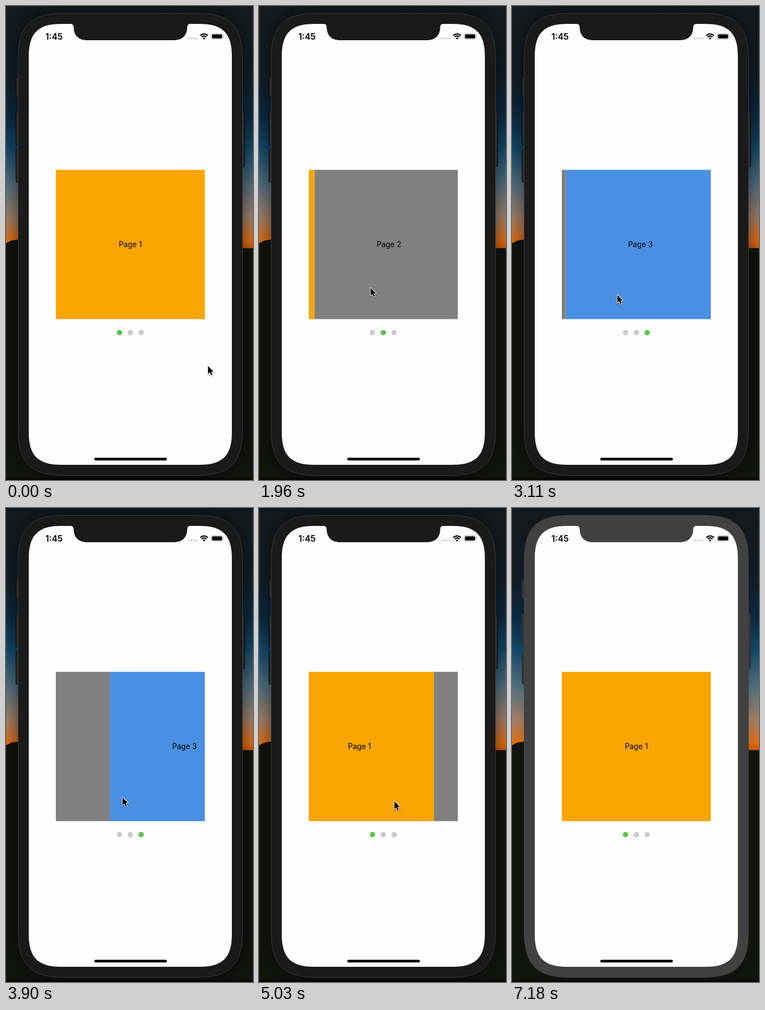
These frames come from a looping animation (456x873 px, 7.28 s). An HTML page:

```html
<!DOCTYPE html>
<html lang="en">
<head>
<meta charset="utf-8">
<title>Page view demo</title>
<style>
  html, body { margin: 0; width: 100%; height: 100%; overflow: hidden; background: #12140f; }
  svg { display: block; width: 100%; height: 100%; }
  text { font-family: Inter, "Open Sans", sans-serif; fill: #000; }
  .label { font-size: 14px; letter-spacing: -.08px; text-anchor: middle; }
  .clock { font-size: 15.8px; font-weight: 600; }
</style>
</head>
<body>
<svg viewBox="0 0 456 873">
  <defs>
    <linearGradient id="sky" gradientUnits="userSpaceOnUse" x1="0" y1="0" x2="0" y2="450">
      <stop offset="0" stop-color="#141a1d"/>
      <stop offset=".3" stop-color="#131e27"/>
      <stop offset=".46" stop-color="#0c2d47"/>
      <stop offset=".58" stop-color="#134b6c"/>
      <stop offset=".74" stop-color="#5b7584"/>
      <stop offset=".87" stop-color="#a98469"/>
      <stop offset=".96" stop-color="#e87316"/>
      <stop offset="1" stop-color="#d05804"/>
    </linearGradient>
    <filter id="blur" x="-30%" y="-20%" width="160%" height="140%"><feGaussianBlur stdDeviation="20"/></filter>
    <filter id="soft" x="-60%" y="-60%" width="220%" height="220%"><feGaussianBlur stdDeviation="1"/></filter>
    <clipPath id="pager"><rect x="92" y="301.650" width="275" height="275"/></clipPath>
    <path id="arrow" d="M0 0V14.400L3.300 11.400L5.600 16.800L7.900 15.800L5.600 10.500H10Z"/>
  </defs>

  <rect width="456" height="450" fill="url(#sky)"/>
  <path d="M0 437L10 432L24 430H60V446H456V873H0Z" fill="#131511"/>
  <rect y="869" width="456" height="4" fill="#0a0809"/>

  <path id="shadow" filter="url(#blur)"/>
  <g id="buttons">
    <rect x="18.5" y="132.5" width="8" height="34" rx="2"/>
    <rect x="18.5" y="195.5" width="8" height="60" rx="2"/>
    <rect x="18.5" y="264.5" width="8" height="60" rx="2"/>
    <rect x="432.5" y="195.5" width="8" height="100" rx="2"/>
  </g>
  <path id="body"/>
  <path id="screen" fill="#fefefe"/>
  <path id="notch" d="M118 32.5C123 33 125 35 125 40C125.5 54 134 63 150 63H309.5C325.5 63 334 54 334.5 40C334.5 35 336.5 33 341.5 32.5Z"/>

  <text class="clock" x="72.700" y="61.500">1:45</text>
  <g id="signal" fill="#cbcbcb"></g>
  <g fill="none" stroke="#000" stroke-width="2.200">
    <path d="M358.700 54.300Q365.700 48.300 372.700 54.300"/>
    <path d="M361.200 57.100Q365.700 53.300 370.200 57.100"/>
  </g>
  <path d="M363.200 59.200Q365.700 57.200 368.200 59.200L365.700 61.700Z"/>
  <rect x="378.700" y="50.700" width="21.800" height="10.600" rx="3" fill="none" stroke="#a5a5a5"/>
  <rect x="380.300" y="52.300" width="18.600" height="7.400" rx="1.600"/>
  <path d="M401.500 54.200Q403.300 56 401.500 57.800Z" fill="#a5a5a5"/>

  <g clip-path="url(#pager)"><g id="pages"></g></g>
  <g id="dots"></g>
  <rect x="163" y="832" width="134" height="5" rx="2.500"/>

  <g id="cursor">
    <use href="#arrow" y="1.500" stroke="#000" stroke-width="2" opacity=".35" filter="url(#soft)"/>
    <use href="#arrow" fill="#fff" stroke="#fff" stroke-width="2" stroke-linejoin="round"/>
    <use href="#arrow"/>
  </g>
</svg>
<script>
const LOOP = 7280, STEP = 88.2, SIZE = 275;
const BLUR_AT = 7180, CURSOR_OUT = 5390;
const $ = id => document.getElementById(id);

function add(parent, tag, attrs, text) {
  const el = document.createElementNS('http://www.w3.org/2000/svg', tag);
  set(el, attrs);
  if (text) el.textContent = text;
  parent.appendChild(el);
  return el;
}

function set(el, attrs) {
  for (const k in attrs) el.setAttribute(k, attrs[k]);
}

// Rectangle with continuous corners: e = corner extent, c = handle offset
function squircle(x, y, w, h, e, c) {
  const r = x + w, b = y + h;
  return `M${x} ${y + e}C${x} ${y + c} ${x + c} ${y} ${x + e} ${y}H${r - e}` +
    `C${r - c} ${y} ${r} ${y + c} ${r} ${y + e}V${b - e}` +
    `C${r} ${b - c} ${r - c} ${b} ${r - e} ${b}H${x + e}` +
    `C${x + c} ${b} ${x} ${b - c} ${x} ${b - e}Z`;
}

const shell = squircle(22.5, 13.5, 414, 851, 84, 23);
set($('shadow'), { d: shell });
set($('body'), { d: shell });
set($('screen'), { d: squircle(42, 33, 375, 812, 60, 17) });

for (let i = 0; i < 4; i++) add($('signal'), 'circle', { cx: 337.6 + i * 4.6, cy: 59.7, r: 1.7 });

['#fba500', '#808080', '#4a90e2'].forEach((fill, i) => {
  const x = 92 + i * SIZE;
  add($('pages'), 'rect', { x, y: 301, width: SIZE, height: SIZE + 1, fill });
  add($('pages'), 'text', { class: 'label', x: x + SIZE / 2, y: 444 }, `Page ${i + 1}`);
});
const dots = [0, 1, 2].map(i => add($('dots'), 'circle', { cx: 209.5 + i * 20, cy: 601.5, r: 5 }));

// Times below are in steps
const swipes = [
  { at: 19, dir: 1 }, { at: 31.9, dir: 1 }, { at: 42.6, dir: -1 }, { at: 54.6, dir: -1 }
];
const home = { x: 373, y: 663 };
const moves = [
  { from: 0, to: 2, x: 365, y: 664 },
  { from: 7, to: 9, x: 362, y: 659 },
  { from: 13, to: 19, x: 294, y: 507.5 },
  { from: 19, to: 22, x: 206, y: 519 },
  { from: 22, to: 29, x: 302, y: 505 },
  { from: 30, to: 35, x: 194.5, y: 532 },
  { from: 35, to: 40, x: 150, y: 534.5 },
  { from: 42, to: 46, x: 242, y: 532 },
  { from: 46, to: 52.5, x: 162, y: 537 },
  { from: 54, to: 57, x: 250, y: 540 },
  { from: 57, to: 60, x: 298, y: 707 }
];

const clamp = u => Math.min(1, Math.max(0, u));
const glide = k => k <= 0 ? 0 : 1 - Math.exp(-Math.pow(k / 1.9, 2.6));

function scrollAt(n) {
  const pages = swipes.reduce((sum, s) => sum + s.dir * glide(n - s.at), 0);
  return Math.round(pages * SIZE * 2) / 2;
}

// Each move starts fast and slows down
function pointAt(n) {
  return moves.reduce((p, m) => {
    const u = Math.sqrt(clamp((n - m.from) / (m.to - m.from)));
    return { x: p.x + (m.x - p.x) * u, y: p.y + (m.y - p.y) * u };
  }, home);
}

function render(t) {
  const n = Math.floor(t / STEP);
  const scroll = scrollAt(n);
  set($('pages'), { transform: `translate(${-scroll} 0)` });
  const active = Math.round(scroll / SIZE);
  dots.forEach((dot, i) => set(dot, { fill: i === active ? '#5ac54b' : '#cbcbcb' }));

  const { x, y } = pointAt(n);
  set($('cursor'), {
    transform: `translate(${x} ${y})`,
    visibility: t < CURSOR_OUT ? 'visible' : 'hidden'
  });

  // The window loses focus at the end of the loop
  const focused = t < BLUR_AT;
  const fill = focused ? '#1a1a1a' : '#414141';
  set($('body'), { fill, stroke: focused ? '#3b3b3b' : '#414141' });
  set($('notch'), { fill });
  set($('buttons'), { fill: focused ? '#282a2a' : '#333', stroke: focused ? '#050505' : '#333' });
  set($('shadow'), { opacity: focused ? 0.62 : 0.2 });
}

const began = performance.now();
function tick() {
  render((performance.now() - began) % LOOP);
  requestAnimationFrame(tick);
}
render(0);
requestAnimationFrame(tick);
</script>
</body>
</html>
```
